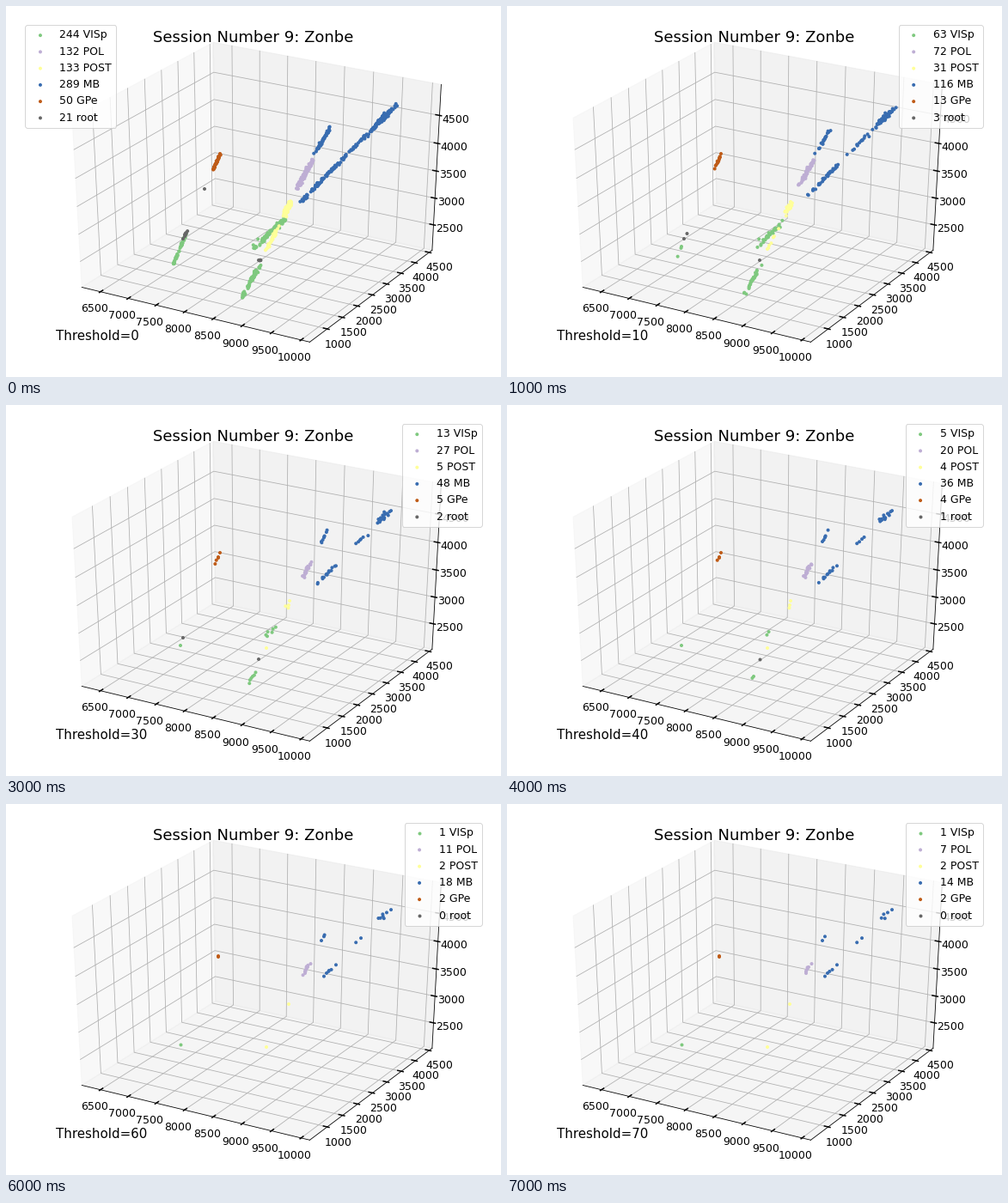
A matplotlib script that plays this animation: 576x432 px, repeating every 8 s.

```python
import numpy as np
import matplotlib.pyplot as plt
from matplotlib.animation import FuncAnimation

W, H = 576, 432
PAD = 16.2
SMALL = 12.495
STEP = 10

plt.rcParams["font.family"] = "DejaVu Sans"

fig = plt.figure(figsize=(W / 72, H / 72), dpi=72, facecolor="white")
ax = fig.add_axes([PAD / W, PAD / H, 1 - 2 * PAD / W, 1 - 2 * PAD / H])
ax.set_xlim(PAD, W - PAD)
ax.set_ylim(H - PAD, PAD)
ax.axis("off")

# ---- perspective box, centred on the origin ----
ELEV, AZIM, DIST = np.radians(30), np.radians(-60), 10
NORMAL = np.array([np.cos(ELEV) * np.cos(AZIM),
                   np.cos(ELEV) * np.sin(AZIM), np.sin(ELEV)])
RIGHT = np.array([-np.sin(AZIM), np.cos(AZIM), 0])
UP = np.cross(NORMAL, RIGHT)
SX, SY = (W - 2 * PAD) / 0.185, (H - 2 * PAD) / 0.185
CX, CY = PAD + 0.095 * SX, H - PAD - 0.095 * SY

EDGE = 0.5 + 1 / 48
TICK_IN, TICK_OUT = EDGE - 0.2 / 12, EDGE + 0.1 / 12
LABEL = EDGE + 11.5 * 48 / (W + H - 4 * PAD) / 12


def project(p):
    p = np.asarray(p, float)
    depth = DIST - p @ NORMAL
    return CX + SX * (p @ RIGHT) / depth, CY - SY * (p @ UP) / depth


def line(points, color="black", width=0.8, z=2):
    x, y = project(points)
    ax.plot(x, y, color=color, lw=width, zorder=z, clip_on=False)


def pane(axis, side, shade):
    """Fill the box face where the given axis is at the given side."""
    corners = np.array([(-1, -1), (1, -1), (1, 1), (-1, 1)]) * EDGE
    x, y = project(np.insert(corners, axis, side * EDGE, axis=1))
    ax.fill(x, y, color=(shade,) * 3, alpha=0.5, lw=1, zorder=0.5)


def scale(first, last, low, high, grid, tick, label):
    """Grid lines, ticks and labels; the last three map a place to points."""
    for value in range(first, last + 1, 500):
        t = (value - low) / (high - low) - 0.5
        line(grid(t), "#b0b0b0", z=1)
        line([tick(t, TICK_IN), tick(t, TICK_OUT)], width=1.5)
        x, y = project(label(t))
        ax.text(x, y, str(value), size=SMALL, ha="center", va="top", zorder=3)


def draw_box():
    e, far = EDGE, LABEL
    pane(0, -1, 0.95)
    pane(1, 1, 0.90)
    pane(2, -1, 0.925)
    scale(6500, 10000, 6240, 10065,
          lambda t: [(t, -e, -e), (t, e, -e), (t, e, e)],
          lambda t, r: (t, -r, -e), lambda t: (t, -far, -far))
    scale(1000, 4500, 527, 4527,
          lambda t: [(e, t, -e), (-e, t, -e), (-e, t, e)],
          lambda t, r: (r, t, -e), lambda t: (far, t, -far))
    scale(2500, 4500, 2078, 4980,
          lambda t: [(-e, -e, t), (-e, e, t), (e, e, t)],
          lambda t, r: (r, e, t), lambda t: (far, far, t))
    line([(-e, -e, -e), (e, -e, -e)])
    line([(e, -e, -e), (e, e, -e)])
    line([(e, e, -e), (e, e, e)])


# ---- point clouds, strongest points first ----
# counts: points left at each threshold; lead: the strongest points;
# strokes: strong share, weak share, focus, start, end, spread.
GROUPS = [
    dict(name="VISp", color="#7fc97f", counts=[244, 63, 31, 13, 5, 2, 1, 1],
         lead=[(203, 280), (287, 316)],
         strokes=[(0.50, 0.38, 0.5, (289, 282), (324, 248), 1.2),
                  (0.46, 0.25, 0.6, (274, 341), (296, 300), 1.0),
                  (0.04, 0.37, 0.5, (195, 300), (211, 262), 0.4)]),
    dict(name="POL", color="#beaed4", counts=[132, 72, 35, 27, 20, 15, 11, 7],
         lead=[],
         strokes=[(1, 1, 0.6, (338, 213), (359, 176), 1.0)]),
    dict(name="POST", color="#ffff99", counts=[133, 31, 10, 5, 4, 3, 2, 2],
         lead=[(329, 233), (303, 283), (330, 228)],
         strokes=[(0.8, 0.65, 0.6, (323, 245), (331, 228), 1.2),
                  (0.2, 0.35, 0.1, (302, 286), (318, 255), 0.8)]),
    dict(name="MB", color="#386cb0",
         counts=[289, 116, 71, 48, 36, 28, 18, 14],
         lead=[],
         strokes=[(0.17, 0.18, 0.6, (358, 174), (379, 139), 0.7),
                  (0.32, 0.26, 0.8, (343, 228), (389, 181), 0.8),
                  (0.12, 0.17, 0.8, (389, 181), (424, 146), 0.8),
                  (0.39, 0.39, 0.55, (424, 146), (454, 115), 1.2)]),
    dict(name="GPe", color="#bf5b17", counts=[50, 13, 7, 5, 4, 3, 2, 2],
         lead=[(247, 177), (247, 178), (249, 172)],
         strokes=[(1, 1, 0.5, (241, 191), (249.5, 172), 0.4)]),
    dict(name="root", color="#666666", counts=[21, 3, 2, 2, 1, 0, 0, 0],
         lead=[(294, 296), (206, 271), (209.5, 265), (231, 213)],
         strokes=[(0.7, 0.7, 0.5, (206, 272), (212, 258), 0.3),
                  (0.3, 0.3, 0.5, (294, 297), (298, 295), 0.3)]),
]

GOLDEN = (5 ** 0.5 - 1) / 2
SITES = 24
rng = np.random.default_rng(9)


def build_cloud(counts, lead, strokes):
    """Strong points gather at each focus, weak ones clump at random sites."""
    points = list(lead)
    sites = rng.random((len(strokes), SITES))
    shares = np.array([s[:2] for s in strokes]).T
    due = np.zeros(len(strokes))
    used = np.zeros(len(strokes))
    total, strong_total = counts[:2]
    for rank in range(len(lead), total):
        strong = rank < strong_total
        due += shares[0 if strong else 1]
        k = due.argmax()
        due[k] -= 1
        focus, start, end, spread = strokes[k][2:]
        if strong:
            reach = 0.3 + 0.7 * rank / strong_total
            u = (0.5 + GOLDEN * used[k]) % 1
            t = focus + (u - focus) * reach
        else:
            t = rng.choice(sites[k])
        used[k] += 1
        place = np.array(start) * (1 - t) + np.array(end) * t
        points.append(place + rng.normal(0, spread, 2))
    return np.array(points, float)


draw_box()
ax.text(W / 2, 42.2, "Session Number 9: Zonbe", size=18, ha="center", zorder=4)
caption = fig.text(0.1, 0.1, "", size=15)

clouds = [build_cloud(g["counts"], g["lead"], g["strokes"]) for g in GROUPS]
dots = [ax.scatter([], [], s=16, color=g["color"], linewidths=0, zorder=2.5,
                   clip_on=False) for g in GROUPS]


def update(i):
    caption.set_text(f"Threshold={i * STEP}")
    labels = []
    for group, cloud, dot in zip(GROUPS, clouds, dots):
        n = group["counts"][i]
        dot.set_offsets(cloud[:n])
        # One colour per point keeps the dots off the pixel grid.
        dot.set_color([group["color"]] * max(n, 1))
        labels.append(f"{n} {group['name']}")
    ax.legend(dots, labels, fontsize=SMALL, framealpha=0.8,
              loc="upper left" if i == 0 else "upper right")
    return dots


anim = FuncAnimation(fig, update, frames=8, interval=1000,
                     repeat=True, repeat_delay=0, blit=False)
plt.show()
```
